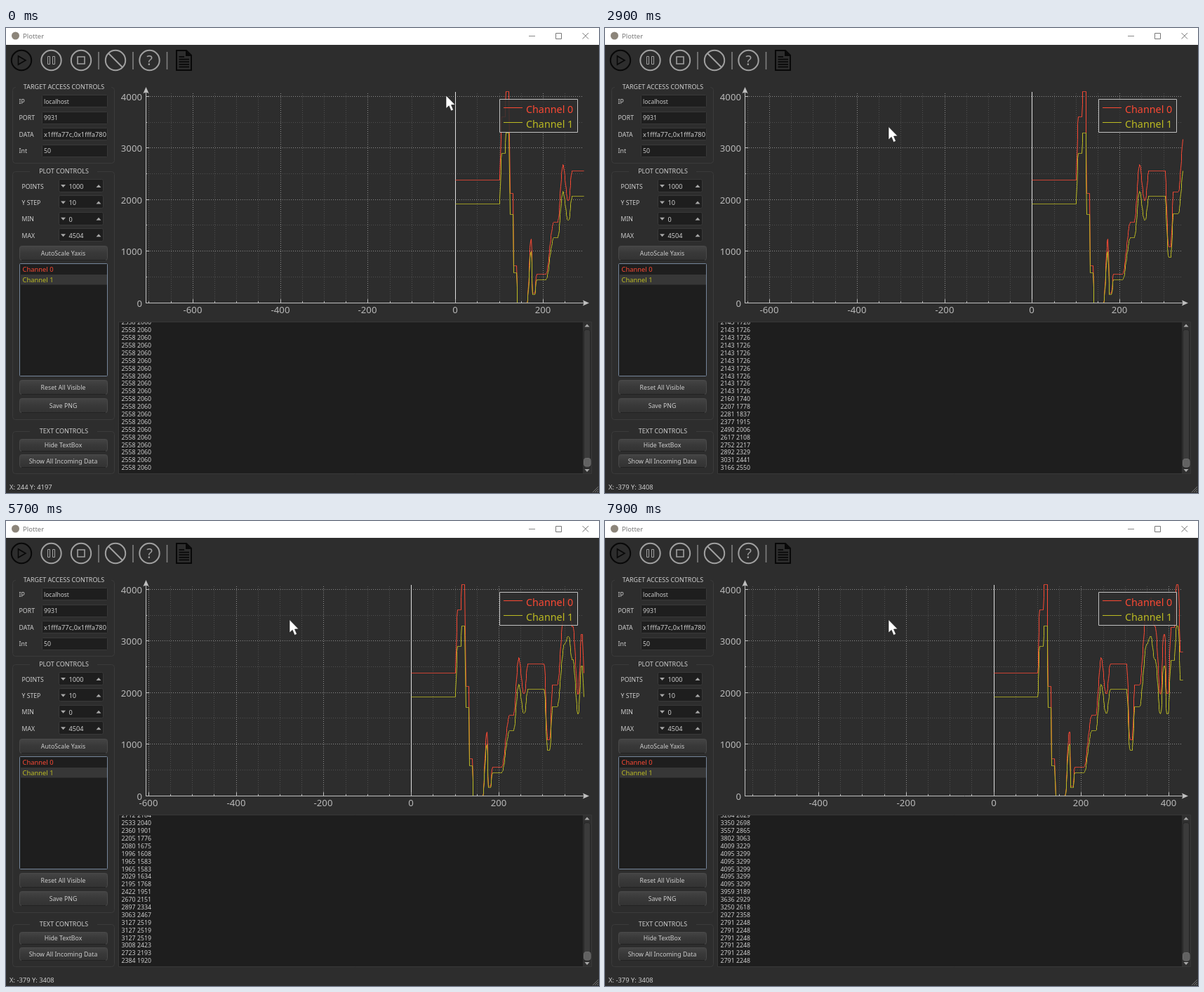
Animation of 845x662 px, one loop 8000 ms. Source, as an HTML page with a canvas:

```html
<!DOCTYPE html>
<html lang="en">
<head>
<meta charset="utf-8">
<title>Plotter</title>
<style>
html, body { margin: 0; width: 100%; height: 100%; overflow: hidden; background: #2d2d2d; }
canvas { display: block; }
</style>
</head>
<body>
<canvas id="stage" width="845" height="662"></canvas>
<script>
const c = document.getElementById('stage').getContext('2d');
const RED = '#fb4934', YELLOW = '#bcbb22', TEXT = '#cdcdcd', DARK = '#1e1e1e', BG = '#2d2d2d';
const LEFT = 199, RIGHT = 823, TOP = 91, BOTTOM = 391;
const X_SCALE = 0.624, Y_SCALE = 0.07335;

// A dial turned from level to level: [start, ramp length, new level].
const REST = 2379;
const turns = [
  [100, 5, 3600], [113, 2, 4095], [122, 2, 2125], [131, 1, 720], [139, 2, 0], [163, 9, 1230],
  [173, 3, 190], [181, 4, 550], [206, 18, 1560], [233, 12, 2680], [245, 11, 1990], [258, 8, 2558],
  [303, 8, 1085], [316, 6, 2143], [333, 16, 3640], [349, 9, 3836], [359, 8, 3280], [369, 11, 1965],
  [381, 7, 3127], [390, 5, 1980], [398, 7, 3264], [412, 5, 4095], [421, 5, 2791]
];
const smooth = p => p * p * (3 - 2 * p);
function first(k) {
  let v = REST;
  for (const [start, ramp, level] of turns) {
    if (k > start) v += (level - v) * smooth(Math.min(1, (k - start) / ramp));
  }
  return Math.round(v);
}
const second = k => Math.floor(first(k) * 0.80567);

const crisp = v => Math.floor(v) + 0.5;

function text(s, x, cy, size = 8.8, color = TEXT, align = 'left') {
  c.font = `${size}px "Noto Sans", "Open Sans", sans-serif`;
  c.fillStyle = color;
  c.textAlign = align;
  c.fillText(s, x, cy + size * 0.36);
}
function paint(fill, stroke, width = 1) {
  if (fill) { c.fillStyle = fill; c.fill(); }
  if (stroke) { c.strokeStyle = stroke; c.lineWidth = width; c.stroke(); }
}
function rect(x, y, w, h, fill, stroke, r = 0) {
  c.beginPath();
  c.roundRect(x, y, w, h, r);
  paint(fill, stroke);
}
function poly(pts, fill, stroke, width = 1) {
  c.beginPath();
  for (let i = 0; i < pts.length; i += 2) c.lineTo(pts[i], pts[i + 1]);
  c.closePath();
  paint(fill, stroke, width);
}
function line(x0, y0, x1, y1, color, width = 1, dash = []) {
  c.setLineDash(dash);
  c.beginPath();
  c.moveTo(x0, y0);
  c.lineTo(x1, y1);
  paint(null, color, width);
  c.setLineDash([]);
}
function ring(x, y, color) {
  c.beginPath();
  c.arc(x, y, 14.2, 0, 7);
  paint(null, color, 2);
}
function clipped(x, y, w, h, draw) {
  c.save();
  c.beginPath();
  c.rect(x, y, w, h);
  c.clip();
  draw();
  c.restore();
}
function arrow(x, y, dir) {
  poly([x - 3.5, y - 2 * dir, x + 3.5, y - 2 * dir, x, y + 2 * dir], '#a8a8a8');
}
function group(title, y, h, gap) {
  rect(9.5, y + 0.5, 145, h, null, '#3b3b3b', 4);
  c.fillStyle = BG;
  c.fillRect(82 - gap, y - 2, gap * 2, 5);
  text(title, 82.5, y, 9, TEXT, 'center');
}
function button(label, y, h) {
  const g = c.createLinearGradient(0, y, 0, y + h);
  g.addColorStop(0, '#454545');
  g.addColorStop(0.5, '#393939');
  g.addColorStop(1, '#333333');
  rect(19.5, y + 0.5, 125, h, g, '#4a4a4a', 3);
  line(22, y + h + 0.5, 142, y + h + 0.5, '#222');
  text(label, 81.5, y + h / 2 + 0.5, 8.75, TEXT, 'center');
}

function toolbar() {
  const grey = '#a0a0a0', black = '#080808';
  ring(22, 46, black);
  poly([17.5, 40, 17.5, 52, 28, 46], null, black, 1.6);
  for (const x of [64.5, 107, 156, 204.5]) ring(x, 46, grey);
  rect(59.5, 40.5, 3, 11, null, grey);
  rect(66.5, 40.5, 3, 11, null, grey);
  poly([102, 41, 112, 41, 112, 51, 102, 51], null, grey, 1.6);
  line(146, 36, 166, 56, grey, 2);
  text('?', 204.5, 46, 20, grey, 'center');
  for (const x of [132, 181, 229.5]) line(x, 34, x, 59, '#808080', 1.6);
  poly([243, 32, 257, 32, 264, 39, 264, 60, 243, 60], null, black, 2);
  poly([256, 32, 256, 40, 264, 40], black);
  for (let y = 41; y < 58; y += 3.6) line(246.5, y, y < 42 ? 254 : 261, y, black, 1.8);
}

function chrome() {
  c.fillStyle = BG;
  c.fillRect(0, 0, 845, 662);
  c.fillStyle = '#fff';
  c.fillRect(0, 0, 845, 24);
  c.beginPath();
  c.arc(13.5, 11, 5.5, 0, 7);
  paint('#8c857a');
  text('Plotter', 24, 11.5, 9.5, '#777');
  line(745, 11.5, 754, 11.5, '#888');
  rect(783.5, 7.5, 8, 8, null, '#777');
  line(821.5, 7, 830, 15.5, '#777');
  line(830, 7, 821.5, 15.5, '#777');
  toolbar();
  for (let i = 2; i < 10; i += 3) line(844 - i, 661, 844, 661 - i, '#777');
}

function sidebar() {
  group('TARGET ACCESS CONTROLS', 84, 108, 68);
  [['IP', 'localhost', 8.5], ['PORT', '9931'], ['DATA', 'x1fffa77c,0x1fffa780', 9.3], ['Int', '50']]
    .forEach(([label, value, size], i) => {
      const y = 104 + i * 23.5;
      text(label, 18.5, y + 0.5);
      rect(51.5, Math.round(y) - 8.5, 93, 17, DARK, '#393939', 1);
      text(value, 54, y + 0.5, size);
    });

  group('PLOT CONTROLS', 204, 353, 48);
  [['POINTS', 1000], ['Y STEP', 10], ['MIN', 0], ['MAX', 4504]].forEach(([label, value], i) => {
    const y = 225 + i * 23.4;
    text(label, 22.5, y + 0.5, 8.7);
    rect(75.5, Math.round(y) - 9.5, 63, 18, DARK, '#393939', 2);
    arrow(81.5, y, 1);
    arrow(132, y, -1);
    text(value, 89.5, y + 0.5, 9.2);
  });
  button('AutoScale Yaxis', 310, 20);
  rect(19.5, 335.5, 125, 160, DARK, '#75859a', 1);
  c.fillStyle = '#373737';
  c.fillRect(21, 351, 123, 14.5);
  text('Channel 0', 23.5, 344, 9.4, RED);
  text('Channel 1', 23.5, 358.5, 9.4, YELLOW);
  button('Reset All Visible', 501, 20);
  button('Save PNG', 527, 20);

  group('TEXT CONTROLS', 574, 60, 48);
  button('Hide TextBox', 585, 17);
  button('Show All Incoming Data', 607, 18);
}

function plot(n) {
  const px = k => crisp(RIGHT - (n - k) * X_SCALE);
  const py = v => crisp(BOTTOM - v * Y_SCALE);
  const start = Math.ceil((n - 1000) / 50) * 50;
  const axis = '#c0c0c0';

  for (const major of [false, true]) {
    const color = major ? '#8c8c8c' : '#505050';
    for (let k = start; k <= n; k += 50) {
      if ((k % 200 === 0) === major && k) line(px(k), BOTTOM, px(k), TOP, color, 1, [1, 2]);
    }
    for (let v = 500; v <= 4000; v += 500) {
      if ((v % 1000 === 0) === major) line(LEFT, py(v), RIGHT, py(v), color, 1, [1, 2]);
    }
  }
  line(px(0), TOP, px(0), BOTTOM, '#e0e0e0');

  clipped(LEFT, TOP - 1, RIGHT - LEFT + 1, BOTTOM - TOP + 1, () => {
    for (const [color, value] of [[RED, first], [YELLOW, second]]) {
      c.beginPath();
      for (let k = 0; k <= n; k++) c.lineTo(px(k), py(value(k)));
      paint(null, color);
    }
  });

  line(LEFT + 0.5, BOTTOM + 0.5, LEFT + 0.5, 89, axis);
  line(LEFT, BOTTOM + 0.5, 826, BOTTOM + 0.5, axis);
  poly([199.5, 84, 203.5, 93, 199.5, 91.5, 195.5, 93], axis);
  poly([831, 391.5, 822, 395.5, 823.5, 391.5, 822, 387.5], axis);
  for (let k = start; k <= n; k += 50) {
    const big = k % 200 === 0;
    line(px(k), BOTTOM, px(k), BOTTOM - (big ? 5 : 2), axis);
    if (big) text(k, px(k) - 0.5, 401.5, 13.2, '#b8b8b8', 'center');
  }
  for (let v = 0; v <= 4000; v += 500) {
    const big = v % 1000 === 0;
    line(LEFT, py(v), LEFT + (big ? 5 : 2), py(v), axis);
    if (big) text(v, 194, py(v) + 0.5, 13.2, '#b8b8b8', 'right');
  }

  rect(703.5, 101.5, 111, 47, 'rgba(45,45,45,.85)', axis);
  [RED, YELLOW].forEach((color, i) => {
    const y = 113.5 + i * 21;
    line(709, y, 736, y, color);
    text('Channel ' + i, 741, y + 2, 14.3, color);
  });
}

function readings(n, t) {
  rect(160.5, 418.5, 674, 216, DARK, '#383838');
  clipped(161, 419, 660, 215, () => {
    for (let i = 0; i < 20; i++) {
      const k = n - 19 + i;
      text(`${first(k)} ${second(k)}`, 164.5, 419.2 + i * 10.89);
    }
  });
  c.fillStyle = '#303030';
  c.fillRect(822, 419, 12, 215);
  rect(823.5, 429.5, 9, 197, '#3b3b3b', '#262626', 3);
  arrow(828, 423.5, -1);
  arrow(828, 630, 1);
  rect(823.5, 612.5 + Math.round(t / 4000), 9.5, 11.5, '#626262', '#6c6c6c', 3);
}

function pointer(x, y) {
  poly([0, 0, 0, 18.5, 4.2, 14.8, 7.2, 22, 10.5, 20.6, 7.5, 13.6, 13, 13.3]
    .map((v, i) => v + (i % 2 ? y : x)), '#fff', '#1a1a1a', 0.6);
}

function frame(now) {
  const t = Math.floor(now % 8000 / 100) * 100;
  const n = Math.floor(292.4 + 17.65 * t / 1000);
  const moved = t >= 100;
  chrome();
  sidebar();
  plot(n);
  readings(n, t);
  text(moved ? 'X: -379 Y: 3408' : 'X: 244 Y: 4197', 5, 653.5, 9.4);
  if (moved) pointer(404, 140.5);
  else pointer(627, 96);
  requestAnimationFrame(frame);
}
requestAnimationFrame(frame);
</script>
</body>
</html>
```
